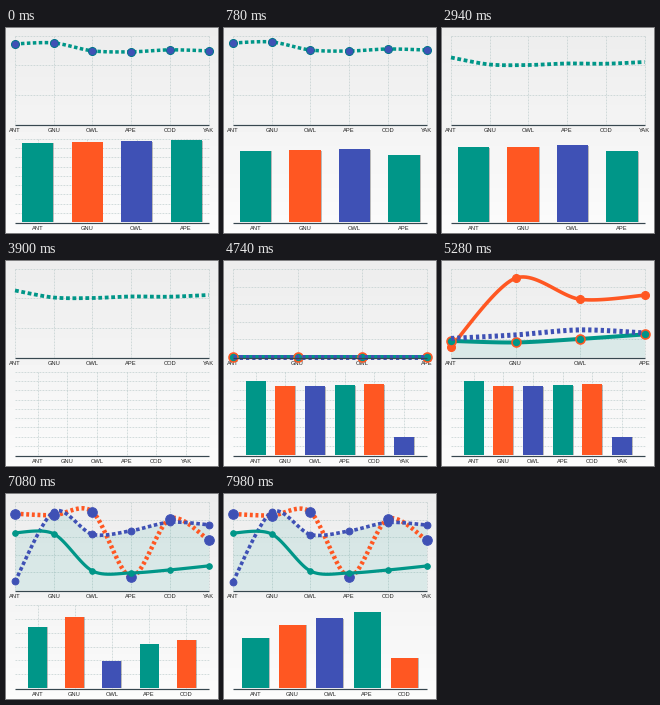
A matplotlib script that plays this animation: 212 px wide and 205 px high, repeating every 8000 ms.

```python
import numpy as np
import matplotlib.pyplot as plt
from matplotlib.animation import FuncAnimation
from matplotlib.patches import Rectangle

W, H, DPI = 212, 205, 64
LOOP, STEP, ENTER = 8000, 40, 800
PX = 72 / DPI
LEFT, RIGHT = 9, 203
LINE_TOP, LINE_BASE = 8, 96
BAR_TOP, BAR_BASE = 111, 194
TEAL, ORANGE, BLUE, INK, GRID = "#009688", "#ff5722", "#3f51b5", "#37474f", "#b9c9c9"
NAMES = ["ANT", "GNU", "OWL", "APE", "COD", "YAK"]
DOTTED = (0, (1, 0.7))
SHORT = (0, (0.65, 0.6))


def quint_out(p):
    return 1 - (1 - p) ** 5


def elastic_out(p):
    if p <= 0 or p >= 1:
        return float(p >= 1)
    return 1 + 2 ** (-10 * p) * np.sin((10 * p - 0.75) * 2 * np.pi / 3)


def series(color, ys, width=3.5, style="-", dot=0, face=None, edge=None, ring=1, fill=False):
    return dict(color=color, ys=np.array(ys, float), width=width, style=style, dot=dot,
                face=face or color, edge=edge or color, ring=ring, fill=fill)


# (start time, easing, grid rows, series)
LINES = [
    (-480, elastic_out, 3, [
        series(TEAL, [15, 14, 22, 23, 21, 22], 3.5, DOTTED, 4, BLUE, "#00758a", 1)]),
    (1260, quint_out, 0, [
        series(TEAL, [45, 44, 44, 50.5, 51], 3.8, DOTTED),
        series(ORANGE, [22.5, 22, 20.3, 20.7, 19], 4)]),
    (2160, quint_out, 3, [
        series(TEAL, [29.5, 36.5, 37, 35.5, 35.7, 34], 3.8, DOTTED)]),
    (4740, elastic_out, 5, [
        series(ORANGE, [86, 17.5, 38.5, 34.5], 3.6, dot=4),
        series(TEAL, [80, 81.5, 78, 73.5], 4, dot=4.5, edge=ORANGE, ring=1.6, fill=True),
        series(BLUE, [77.5, 74, 69, 72], 5, SHORT)]),
    (6480, elastic_out, 5, [
        series(ORANGE, [20, 21.5, 18, 83, 25, 46], 4.5, SHORT, 4.8, BLUE, BLUE),
        series(BLUE, [87.5, 18, 40.5, 37, 28.5, 31], 3.6, DOTTED, 3.4, fill=True),
        series(TEAL, [39, 40, 77, 79, 76, 72], 3.2, dot=2.8, fill=True)]),
]

# (start time, grid rows, bar width, bar tops)
BARS = [
    (-1320, 9, 31, [114.5, 114, 113, 112]),
    (420, 0, 31.5, [119, 118.5, 117.3, 123]),
    (3000, 0, 27, [126, 120, 131, 124, 140]),
    (3900, 9, 20, [120, 124.5, 125.3, 124, 123, 175.5]),
    (5640, 6, 19, [132.5, 122.5, 166.5, 150, 145.5]),
    (7320, 0, 27, [143.5, 130.5, 124, 118, 163.5]),
]
BAR_COLORS = {4: [TEAL, ORANGE, BLUE, TEAL],
              5: [TEAL, ORANGE, BLUE, TEAL, ORANGE],
              6: [TEAL, ORANGE, BLUE, TEAL, ORANGE, BLUE]}

fig = plt.figure(figsize=(W / DPI, H / DPI), dpi=DPI)
ax = fig.add_axes([0, 0, 1, 1])
ax.set(xlim=(0, W), ylim=(H, 0))
ax.axis("off")
ax.imshow(np.linspace(0.928, 0.985, 64)[:, None], cmap="gray", vmin=0, vmax=1,
          extent=(0, W, H, 0), aspect="auto", interpolation="bilinear", zorder=0)
drawn = []


def stroke(x, y, color, width, style="-", z=3):
    drawn.extend(ax.plot(x, y, color=color, lw=width * PX, ls=style, zorder=z,
                         dash_capstyle="butt", solid_capstyle="butt"))


def smooth(xs, ys, n=24):
    """Cubic curve whose tangents follow the neighbouring points."""
    pts = np.column_stack([xs, ys])
    padded = np.vstack([pts[:1], pts, pts[-1:]])
    handle = 0.15 * (padded[2:] - padded[:-2])
    t = np.linspace(0, 1, n)[:, None]
    parts = []
    for i in range(len(pts) - 1):
        a, d = pts[i], pts[i + 1]
        b, c = a + handle[i], d - handle[i + 1]
        parts.append((1 - t) ** 3 * a + 3 * t * (1 - t) ** 2 * b
                     + 3 * t ** 2 * (1 - t) * c + t ** 3 * d)
    return np.vstack(parts).T


def draw_frame(xs, top, base, rows):
    if rows:
        for y in np.linspace(top, base, rows + 1)[:-1]:
            stroke([LEFT, RIGHT], [y, y], GRID, 0.6, (0, (3, 2)), 1)
        for x in xs:
            stroke([x, x], [top, base], GRID, 0.6, (0, (3, 2)), 1)
    stroke([LEFT, RIGHT], [base + 0.5] * 2, INK, 1.2, z=6)
    for x, name in zip(xs, NAMES):
        drawn.append(ax.text(x, base + 6, name, ha="center", va="center_baseline",
                             fontsize=5.8 * PX, family="Liberation Sans", color="#222222"))


def draw_lines(now):
    start, ease, rows, group = [c for c in LINES if c[0] <= now][-1]
    grow = ease(min((now - start) / ENTER, 1))
    xs = np.linspace(LEFT, RIGHT - 0.5, len(group[0]["ys"]))
    draw_frame(xs, LINE_TOP, LINE_BASE, rows)
    placed = [LINE_BASE + (s["ys"] - LINE_BASE) * grow for s in group]
    curves = [smooth(xs, ys) for ys in placed]
    filled = [c[1] for c, s in zip(curves, group) if s["fill"]]
    if filled:
        drawn.append(ax.fill_between(curves[0][0], np.min(filled, axis=0), LINE_BASE,
                                     color=TEAL, alpha=0.1, lw=0, zorder=2))
    for z, (s, ys, curve) in enumerate(zip(group, placed, curves)):
        stroke(*curve, s["color"], s["width"], s["style"], 3 + z / 4)
        if s["dot"]:
            drawn.extend(ax.plot(xs, ys, "o", ms=2 * s["dot"] * PX, mfc=s["face"],
                                 mec=s["edge"], mew=s["ring"] * PX, zorder=3.1 + z / 4))


def draw_bars(now):
    start, rows, width, tops = [c for c in BARS if c[0] <= now][-1]
    grow = quint_out(min((now - start) / ENTER, 1))
    xs = np.linspace(31.5, 180.2, len(tops))
    draw_frame(xs, BAR_TOP, BAR_BASE, rows)
    for x, top, color in zip(xs, tops, BAR_COLORS[len(tops)]):
        height = (BAR_BASE - top) * grow
        if height <= 0:
            continue
        corner = (x - width / 2, BAR_BASE - height)
        shadow = (corner[0] + 0.8, corner[1] + 0.5)
        for xy, fill, alpha, z in ((shadow, "black", 0.25, 2), (corner, color, 1, 3)):
            h = BAR_BASE - xy[1]
            drawn.append(ax.add_patch(Rectangle(xy, width, h, fc=fill, alpha=alpha,
                                                lw=0, zorder=z)))


def update(i):
    while drawn:
        drawn.pop().remove()
    now = i * STEP + STEP / 2
    draw_lines(now)
    draw_bars(now)
    return []


anim = FuncAnimation(fig, update, frames=LOOP // STEP, interval=STEP,
                     init_func=lambda: [], repeat=True, repeat_delay=0)
plt.show()
```
